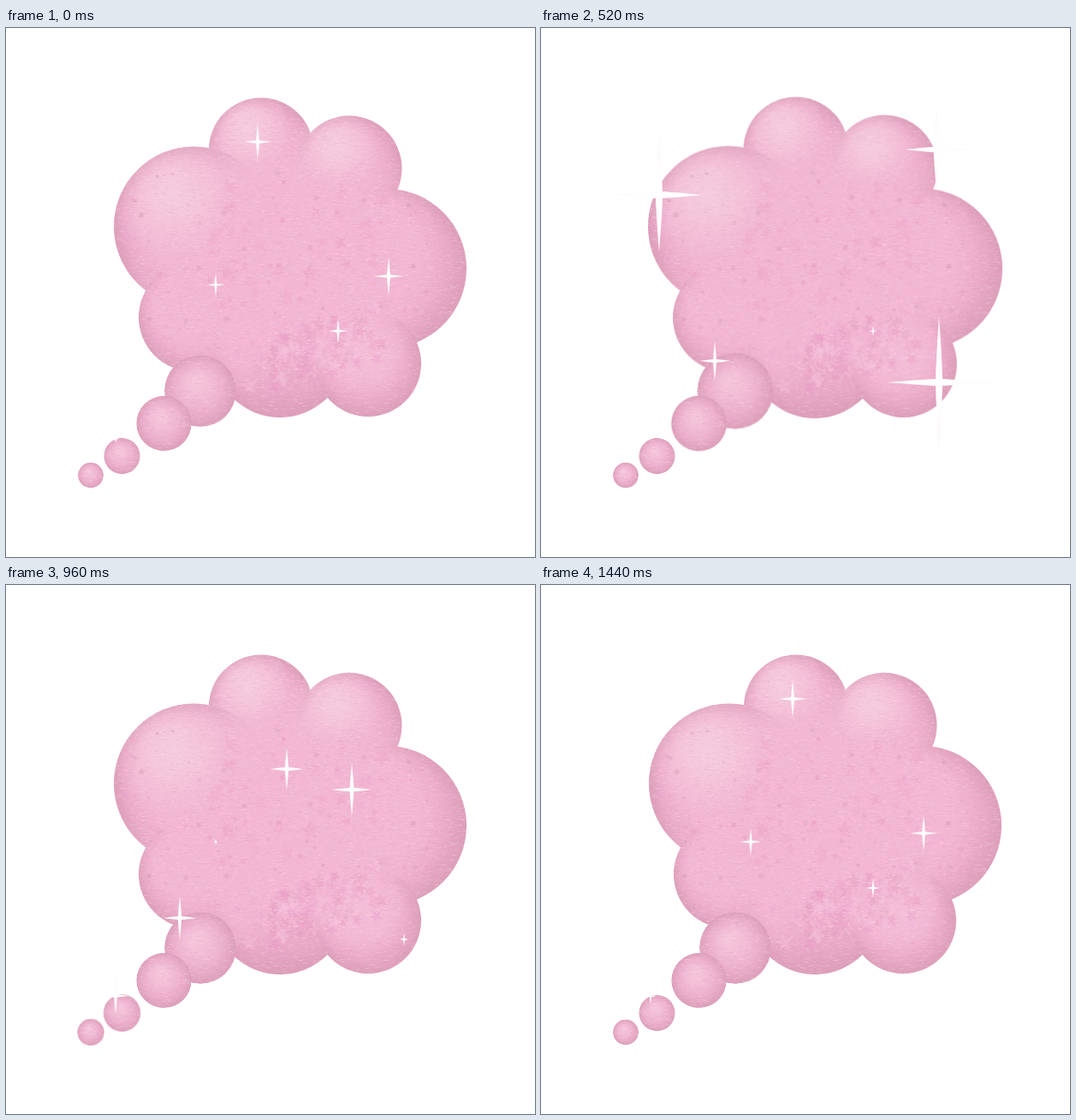
An HTML page with a canvas that plays this animation: 618 by 618 pixels, repeating every 1.48 s.

```html
<!DOCTYPE html>
<html lang="en">
<head>
<meta charset="utf-8">
<title>Sparkling thought bubble</title>
<style>
  html, body { margin: 0; width: 100%; height: 100%; overflow: hidden; background: #fff; }
  canvas { display: block; width: 618px; height: 618px; }
</style>
</head>
<body>
<canvas id="stage" width="618" height="618"></canvas>
<script>
const SIZE = 618, LOOP = 1480, STEP = 40, TAU = Math.PI * 2;
const ctx = document.getElementById('stage').getContext('2d');

let seed = 41;
const rnd = () => (seed = (seed * 16807) % 2147483647) / 2147483647;
const range = (a, b) => a + (b - a) * rnd();
const pick = list => list[Math.floor(rnd() * list.length)];

// Circles: x, y, radius
const LOBES = [
  [298, 142.5, 61], [401, 164, 61.5], [219.5, 232, 93.5], [445, 281, 93],
  [218, 338, 63], [320, 377, 78], [423, 392, 62]
];
const TAIL = [[227, 424, 42], [184.5, 462, 32.3], [135.5, 500, 21.2], [99, 522.5, 15]];

// Sparkles in order of appearance: x, y, largest half height
const SPARKS = [
  [462, 142, 65], [138, 195, 68], [465, 414, 85], [203, 389, 42], [328, 215, 26], [404, 239, 32],
  [128, 480, 31], [245, 300, 20], [294, 133, 22], [447, 290, 24], [388, 354, 24]
];
const SPARK_LIFE = 730, SPARK_LEAD = 20;

const swell = k => k <= 0 || k >= 1 ? 0 : Math.sin(Math.PI * k);

function layer() {
  const c = document.createElement('canvas');
  c.width = c.height = SIZE;
  return c.getContext('2d');
}

function disc(g, x, y, r, fill) {
  g.beginPath();
  g.arc(x, y, r, 0, TAU);
  g.fillStyle = fill;
  g.fill();
}

// Evenly spaced colours from (x0, y0) out to the circle, starting at a share of the radius
function radial(g, x0, y0, x, y, r, colors, from = 0) {
  const grad = g.createRadialGradient(x0, y0, r * from, x, y, r);
  colors.forEach((color, i) => grad.addColorStop(i / (colors.length - 1), color));
  return grad;
}

function glow(g, x, y, r, rgb, alpha) {
  const colors = [1, .75, .3, 0].map(a => `rgba(${rgb},${a * alpha})`);
  disc(g, x, y, r, radial(g, x, y, x, y, r, colors));
}

function star(g, x, y, r, color, alpha) {
  const turn = range(0, TAU);
  g.beginPath();
  for (let i = 0; i < 10; i++) {
    const a = turn + i * TAU / 10, d = i % 2 ? r * .45 : r;
    g.lineTo(x + Math.cos(a) * d, y + Math.sin(a) * d);
  }
  g.globalAlpha = alpha;
  g.fillStyle = color;
  g.fill();
  g.globalAlpha = 1;
}

function grain(g, x, y, w, h) {
  for (let i = w * h * .1; i > 0; i--) {
    g.fillStyle = pick(['rgba(215,135,172,.11)', 'rgba(255,226,240,.17)']);
    g.fillRect(Math.floor(range(x, x + w)), Math.floor(range(y, y + h)), Math.ceil(range(0, 5)), 1);
  }
}

function confetti(g) {
  for (let i = 0; i < 110; i++) {
    star(g, range(140, 525), range(165, 365), range(2, 5),
      pick(['#dc9ab9', '#e99ac1', '#d3a0b6', '#eca6d2']), range(.25, .55));
  }
  for (let i = 0; i < 40; i++) {
    star(g, range(240, 440), range(180, 330), range(5, 11), '#ec9fc4', range(.18, .36));
  }
  // Denser drift along the bottom
  for (let i = 0; i < 140; i++) {
    const x = (range(250, 455) + range(255, 460)) / 2;
    star(g, x, 405 - (x - 280) * .3 + range(-34, 28), range(4, 11),
      pick(['#e99cc1', '#f6c4dd', '#eba2ce', '#e3a0bf']), range(.2, .5));
  }
}

function paintCloud() {
  const g = layer();
  g.beginPath();
  for (const [x, y, r] of LOBES) {
    g.moveTo(x + r, y);
    g.arc(x, y, r, 0, TAU);
  }
  g.moveTo(475, 275);
  g.ellipse(325, 275, 150, 140, 0, 0, TAU);
  g.clip();
  g.fillStyle = '#f2b7d2';
  g.fillRect(0, 0, SIZE, SIZE);

  for (const [x, y, r] of LOBES) {
    disc(g, x, y, r, radial(g, x - r * .15, y - r * .2, x, y, r, ['#f2b7d2', '#ebacc8', '#dc9fba'], .55));
  }
  // Blend the lobes into one body, keeping the rim shading
  g.save();
  g.translate(325, 272);
  g.scale(1, .88);
  disc(g, 0, 0, 190, radial(g, 0, 0, 0, 0, 190, ['#f2b7d2', 'rgba(242,183,210,0)'], .66));
  g.restore();

  for (const [x, y, r] of LOBES.slice(0, 3)) {
    glow(g, x - r * .25, y - r * .4, r * .8, '246,208,225', .85);
  }
  glow(g, 425, 382, 50, '245,196,218', .5);
  glow(g, 322, 437, 72, '221,157,186', .45);
  confetti(g);
  grain(g, 115, 75, 430, 385);
  return g.canvas;
}

function paintBall([x, y, r]) {
  const g = layer();
  g.beginPath();
  g.arc(x, y, r, 0, TAU);
  g.clip();
  disc(g, x, y, r, radial(g, x - r * .15, y - r * .3, x, y, r,
    ['#f5c8dc', '#f2bed6', '#ecb0cc', '#dc9fba']));
  grain(g, x - r, y - r, 2 * r, 2 * r);
  return g.canvas;
}

const cloud = paintCloud();
const balls = TAIL.map(paintBall);

// Draw a layer enlarged about a point, by a smooth pulse
function drawPulse(image, x, y, k, amount) {
  const s = 1 + amount * swell(k) ** 2;
  ctx.setTransform(s, 0, 0, s, x - x * s, y - y * s);
  ctx.drawImage(image, 0, 0);
  ctx.setTransform(1, 0, 0, 1, 0, 0);
}

function drawSpark(x, y, v) {
  if (v < 1) return;
  const h = v * .78, c = Math.min(v * .06 + .5, 4);
  ctx.save();
  ctx.translate(x, y);
  ctx.beginPath();
  for (const [sx, sy] of [[1, 1], [-1, 1], [-1, -1], [1, -1]]) {
    ctx.moveTo(0, 0);
    ctx.lineTo(0, sy * v);
    ctx.quadraticCurveTo(sx * c * .8, sy * v * .4, sx * c, sy * c);
    ctx.quadraticCurveTo(sx * h * .4, sy * c * .7, sx * h, 0);
  }
  ctx.fillStyle = radial(ctx, 0, 0, 0, 0, v, ['#fff', '#fffcfd', '#fcf2f6']);
  ctx.fill();
  ctx.restore();
}

function draw(t) {
  ctx.fillStyle = '#fff';
  ctx.fillRect(0, 0, SIZE, SIZE);
  drawPulse(cloud, 332, 268.5, t / 580, .05);
  TAIL.forEach(([x, y], i) => drawPulse(balls[i], x, y, (t - 300 - 160 * i) / 460, .06));
  SPARKS.forEach(([x, y, size], i) => {
    const start = i * LOOP / SPARKS.length - SPARK_LEAD;
    const age = (t - start + LOOP) % LOOP;
    drawSpark(x, y, size * swell(age / SPARK_LIFE));
  });
}

const origin = performance.now();
function tick() {
  const t = (performance.now() - origin) % LOOP;
  draw(Math.floor(t / STEP) * STEP);
  requestAnimationFrame(tick);
}
tick();
</script>
</body>
</html>
```
